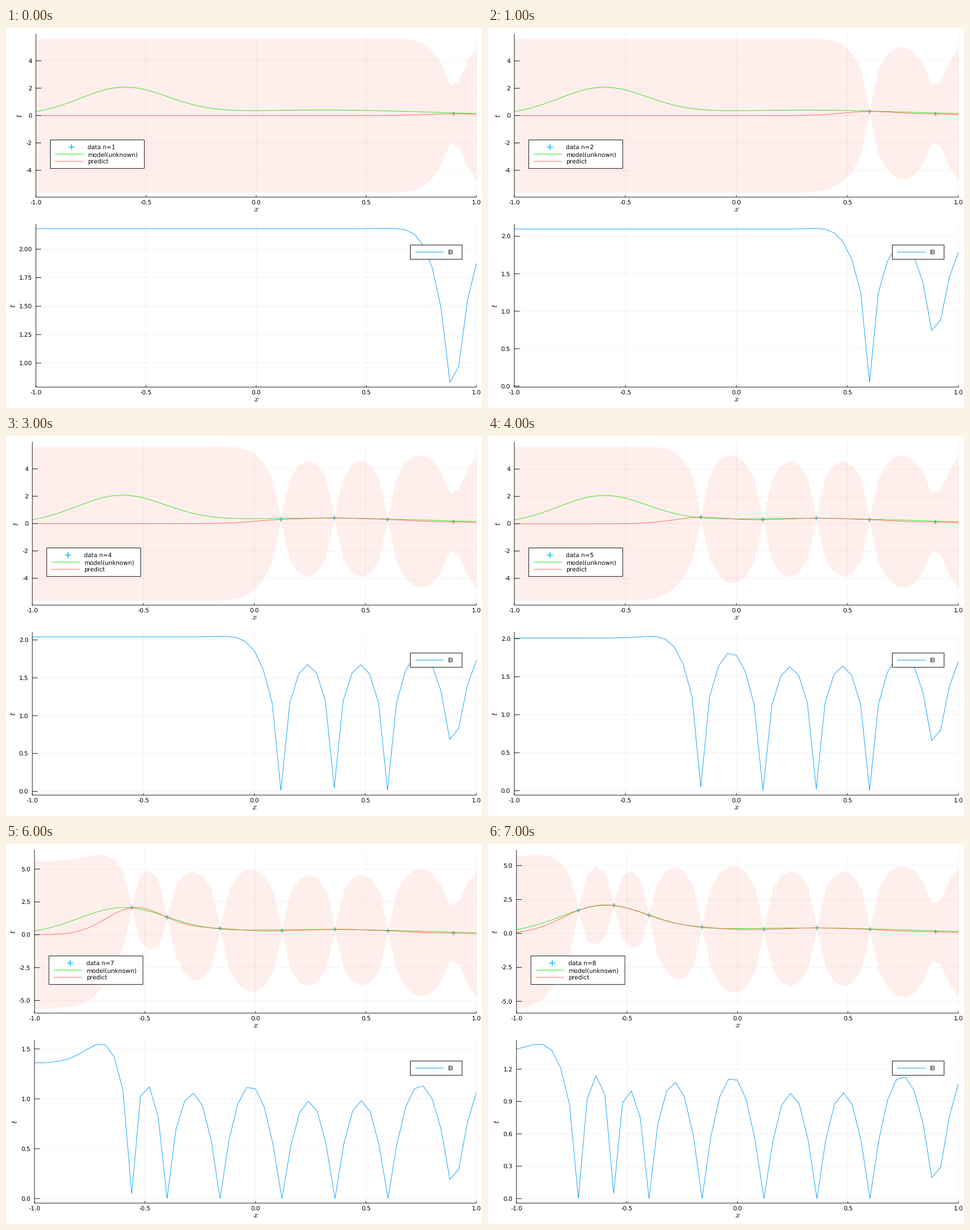
A matplotlib script that plays this animation: 800 by 640 pixels, repeating every 8000 ms.

```python
import math

import matplotlib.pyplot as plt
import numpy as np
from matplotlib.animation import FuncAnimation
from matplotlib.patches import Rectangle

W, H, DPI = 800, 640, 100
PX = 72 / DPI                      # points per pixel
RIGHT = 790.5
TOP_BOX, LOW_BOX = (9.8, 284.9), (329.8, 604.9)
FONT = 9.6
THIN = 0.85

SKY, LIME, TOMATO, BLUE = "deepskyblue", "#0df20d", "tomato", "#009afa"

# Gaussian process settings and observations in order of sampling
AMP, DECAY, NOISE = 1000.0, 1 / 0.03, 1e-4
XS = np.array([0.8968, 0.6, 0.36, 0.12, -0.16, -0.4, -0.56, -0.72])
YS = np.array([0.126, 0.30, 0.416, 0.30, 0.483, 1.334, 2.07, 1.70])
GRID = np.linspace(-1, 1, 51)

plt.rcParams.update({
    "font.family": "DejaVu Sans",
    "mathtext.fontset": "cm",
    "text.hinting": "none",
    "text.hinting_factor": 1,
    "lines.solid_capstyle": "butt",
})

fig = plt.figure(figsize=(W / DPI, H / DPI), dpi=DPI, facecolor="white")
ax = fig.add_axes([0, 0, 1, 1])


def model(x):
    return (2 * np.exp(-(x + 0.6) ** 2 / 0.08)
            + 0.4 * np.exp(-(x - 0.3) ** 2 / 0.5))


def kernel(a, b):
    return AMP * np.exp(-DECAY * (a[:, None] - b[None, :]) ** 2)


def posterior(n):
    x, y = XS[:n], YS[:n]
    cov = kernel(x, x) + NOISE * np.eye(n)
    k = kernel(x, GRID)
    sol = np.linalg.solve(cov, k)
    var = AMP + NOISE - (k * sol).sum(axis=0)
    return sol.T @ y, np.maximum(var, NOISE) ** 0.25


def expected_improvement(mean, dev, best):
    z = (mean - best) / dev
    cdf = 0.5 * (1 + np.vectorize(math.erf)(z / math.sqrt(2)))
    pdf = np.exp(-z * z / 2) / math.sqrt(2 * math.pi)
    return (mean - best) * cdf + dev * pdf


def line(x, y, color="black", width=THIN, **kw):
    ax.plot(x, y, color=color, lw=width * PX, snap=False, **kw)


def plus(x, y, size, width):
    r = size / 2
    line([x - r, x + r], [y, y], SKY, width)
    line([x, x], [y - r, y + r], SKY, width)


def text(x, y, s, ha="left"):
    ax.text(x, y + 3.5, s, ha=ha, va="baseline", fontsize=FONT * PX)


def label(x, y, s, rotation=0):
    ax.text(x, y, s, ha="center", va="center", rotation=rotation,
            fontsize=14 * PX)


def legend_box(x, y, w, h):
    ax.add_patch(Rectangle((x, y), w, h, fc="white", ec="black",
                           lw=THIN * PX, zorder=2, snap=False))


class Panel:
    """Maps data to pixels inside one plot box and draws its frame."""

    def __init__(self, box, left, low, high, step, digits):
        self.top, self.bottom = box
        self.left = left
        pad = 0.03 * (high - low)
        self.low, self.high = low - pad, high + pad
        first = math.ceil(self.low / step)
        last = math.floor(self.high / step)
        self.ticks = [i * step for i in range(first, last + 1)]
        self.names = [f"{t:.{digits}f}" for t in self.ticks]

    def x(self, v):
        return self.left + (np.asarray(v) + 1) / 2 * (RIGHT - self.left)

    def y(self, v):
        part = (np.asarray(v) - self.low) / (self.high - self.low)
        return self.bottom - part * (self.bottom - self.top)

    def curve(self, values, color):
        line(self.x(GRID), self.y(values), color)

    def grid(self):
        for t in (-0.5, 0, 0.5, 1):
            line([self.x(t)] * 2, [self.top, self.bottom], alpha=0.06)
        for t in self.ticks:
            line([self.left, RIGHT], [self.y(t)] * 2, alpha=0.06)

    def axes(self):
        line([self.left, self.left], [self.top, self.bottom])
        line([self.left, RIGHT], [self.bottom, self.bottom])
        for t in (-1, -0.5, 0, 0.5, 1):
            line([self.x(t)] * 2, [self.bottom, self.bottom - 3.3])
            text(self.x(t), self.bottom + 8.9, f"{t:.1f}", "center")
        for t, name in zip(self.ticks, self.names):
            line([self.left, self.left + 8.9], [self.y(t)] * 2)
            text(self.left - 6.5, self.y(t), name, "right")
        em = {"-": 0.361, ".": 0.318}
        widest = max(sum(em.get(c, 0.636) for c in s) for s in self.names)
        label((self.left + RIGHT) / 2, self.bottom + 20.3, "$x$")
        label(self.left - 17.3 - widest * FONT,
              (self.top + self.bottom) / 2, "$t$", 90)


def draw_prediction(n, left, mean, dev):
    upper, lower = mean + dev, mean - dev
    step, digits = (2, 0) if n < 6 else (2.5, 1)
    p = Panel(TOP_BOX, left, lower.min(), upper.max(), step, digits)
    p.grid()
    for x, y in zip(p.x(XS[:n]), p.y(YS[:n])):
        plus(x, y, 7, 1.4)
    p.curve(model(GRID), LIME)
    ax.fill_between(p.x(GRID), p.y(lower), p.y(upper),
                    color=TOMATO, alpha=0.1, lw=0, zorder=2)
    p.curve(mean, TOMATO)
    p.axes()

    legend_box(left + 24.2, 188.5, 158, 48)
    plus(left + 60, 200.5, 10, 1.5)
    ends = [left + 32, left + 80]
    line(ends, [212.5] * 2, LIME)
    line(ends, [224.5] * 2, TOMATO)
    for i, name in enumerate((f"data n={n}", "model(unknown)", "predict")):
        text(left + 87, 200.7 + 12 * i, name)


def draw_improvement(n, left, gain):
    step, digits = {1: (0.25, 2), 8: (0.3, 1)}.get(n, (0.5, 1))
    p = Panel(LOW_BOX, left, gain.min(), gain.max(), step, digits)
    p.grid()
    p.curve(gain, BLUE)
    p.axes()

    legend_box(679.5, 365.5, 87, 24)
    line([688, 735.5], [377.5] * 2, BLUE)
    text(742, 377.7, "EI")


def draw(i):
    n = i + 1
    ax.clear()
    ax.set_xlim(0, W)
    ax.set_ylim(H, 0)
    ax.axis("off")
    left = 50.2 if n == 1 else 44.2 if n < 6 else 47.9
    mean, dev = posterior(n)
    draw_prediction(n, left, mean, dev)
    draw_improvement(n, left, expected_improvement(mean, dev, YS[:n].max()))
    return []


anim = FuncAnimation(fig, draw, frames=8, interval=1000, repeat=True)
plt.show()
```
